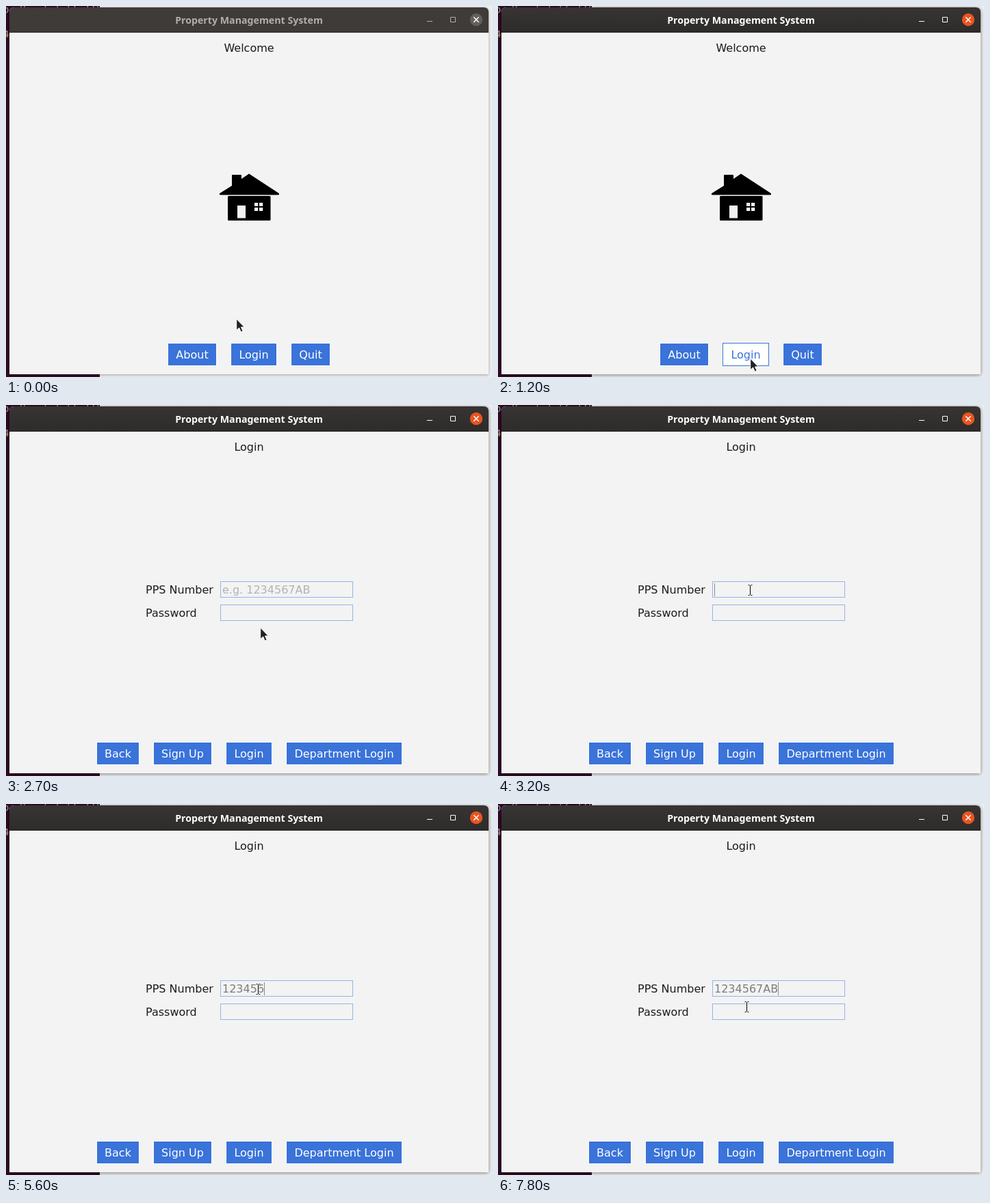
An HTML page for the animation above (8 s loop, 710 by 543 pixels).

```html
<!DOCTYPE html>
<html lang="en">
<head>
<meta charset="utf-8">
<title>Property Management System</title>
<style>
  html, body { margin: 0; width: 100%; height: 100%; overflow: hidden; background: #f1f0f0; }
  svg { position: absolute; left: 0; top: 0; display: block; }
  text { font: 16px "DejaVu Sans", sans-serif; fill: #1c1c1c; white-space: pre; }
  .title { font: bold 14.2px "Noto Sans", "Open Sans", sans-serif; fill: #fff; }
  .mono { font: 14px "DejaVu Sans Mono", monospace; }
  .mid { text-anchor: middle; }
  .btn rect { fill: #3a73d9; stroke: #fff; }
  .btn text { fill: #fff; }
  .btn.hover rect { fill: #fff; stroke: #3a73d9; }
  .btn.hover text { fill: #3a73d9; }
  .field { fill: #f3f3f3; stroke: #94b5e5; }
  .blurred .title { fill: #b3aea7; }
  .blurred .bar { fill: #3e3b39; }
  .blurred .ctl { stroke: #b3aea7; }
  .blurred .close { fill: #62605e; }
  .bar { fill: url(#bar); }
  .ctl { fill: none; stroke: #fff; }
  .close { fill: #e95420; }
  .frame { fill: #f3f3f3; filter: drop-shadow(0 1px 3px rgba(0, 0, 0, .5)); }
  .blurred .frame { filter: drop-shadow(0 1px 2px rgba(0, 0, 0, .36)); }
</style>
</head>
<body>
<svg width="710" height="543" viewBox="0 0 710 543">
  <defs>
    <linearGradient id="bar" x1="0" y1="0" x2="0" y2="1">
      <stop offset="0" stop-color="#373433"/>
      <stop offset="1" stop-color="#2e2b2b"/>
    </linearGradient>
  </defs>

  <rect width="710" height="543" fill="#f1f0f0"/>
  <rect width="137" height="543" fill="#300a24"/>
  <text class="mono" x="-4" y="10" style="fill:#9aa0ad">o</text>
  <text class="mono" x="-4" y="46" style="fill:#b59c83">4</text>
  <text class="mono" x="20" y="5" style="fill:#a89ba8">p   l 1 l1 551</text>

  <g id="win">
    <path class="frame" d="M5 539V9q0-7 7-7H698q7 0 7 7V539z"/>
    <path class="bar" d="M5 39V9q0-7 7-7H698q7 0 7 7V39z"/>
    <path d="M5 38.5H705" stroke="#242221"/>
    <text class="title mid" x="355" y="26">Property Management System</text>
    <path class="ctl" d="M615 22.5H623M649.5 16.5H656.5V23.5H649.5z"/>
    <circle class="close" cx="687" cy="20" r="9.2"/>
    <path d="M683.3 16.3l7.4 7.4m0-7.4l-7.4 7.4" stroke="#fff" stroke-width="1.5"/>
  </g>

  <g id="home">
    <text class="mid" x="355" y="67">Welcome</text>
    <path d="M330 263V248q0-1 1-1H343q1 0 1 1V253L355 245.5 398.5 274q1.5 2.5-1 2.5H313.5q-3 0-1-2.5z"/>
    <rect x="324" y="278" width="62.5" height="36" rx="1.5"/>
    <path d="M338 292h12v18.5h-12zM363 288h5.2v5h-5.2zM370 288h5.2v5h-5.2zM363 295h5.2v5h-5.2zM370 295h5.2v5h-5.2z" fill="#f3f3f3"/>
  </g>

  <g id="login">
    <text class="mid" x="355" y="67">Login</text>
    <text x="204" y="276">PPS Number</text>
    <text x="204" y="310">Password</text>
    <rect class="field" x="313.5" y="258.5" width="193" height="23"/>
    <rect class="field" x="313.5" y="292.5" width="193" height="23"/>
    <text id="entry" x="316" y="276"></text>
    <rect id="caret" y="261" width="1" height="19" fill="#8a8a8a"/>
  </g>

  <path id="arrow" d="M.7 1V17.6L4.6 14 7.2 20 10.1 18.8 7.5 13H12.3z" fill="#222" stroke="#fff" stroke-linejoin="round"/>
  <g id="beam" fill="none">
    <path d="M-3-7.5H3M-3 7.5H3M0-7.5V7.5" stroke="#fff" stroke-width="3"/>
    <path d="M-3-7.5H-.8M.8-7.5H3M-3 7.5H-.8M.8 7.5H3M0-7V7" stroke="#111" stroke-width="1.2"/>
  </g>
</svg>
<script>
const LOOP = 8000;
const $ = id => document.getElementById(id);

function el(parent, tag, attrs, text = '') {
  const node = document.createElementNS('http://www.w3.org/2000/svg', tag);
  for (const key in attrs) node.setAttribute(key, attrs[key]);
  node.textContent = text;
  return parent.appendChild(node);
}

function button(page, label, left, right) {
  const g = el($(page), 'g', { class: 'btn' });
  el(g, 'rect', { x: left - 0.5, y: 493.5, width: right - left + 1, height: 33 });
  el(g, 'text', { class: 'mid', x: (left + right) / 2, y: 516 }, label);
  return g;
}

button('home', 'About', 237, 307);
const loginBtn = button('home', 'Login', 329, 395);
button('home', 'Quit', 417, 473);
button('login', 'Back', 133, 194);
button('login', 'Sign Up', 216, 300);
button('login', 'Login', 322, 388);
button('login', 'Department Login', 410, 578);

// [start ms, shape, x, y]
const pointer = [
  [0, 'arrow', 336, 457], [100, 'arrow', 344, 471], [200, 'arrow', 360, 498],
  [300, 'arrow', 366, 511], [500, 'arrow', 368, 515],
  [2400, 'arrow', 368, 480], [2500, 'arrow', 368, 398],
  [2700, 'arrow', 371, 325], [2800, 'beam', 370.5, 262.5], [2900, 'beam', 368.5, 271],
  [7400, 'beam', 368.5, 274], [7500, 'beam', 367.5, 281], [7600, 'beam', 365.5, 289],
  [7700, 'beam', 364.5, 294], [7800, 'beam', 363.5, 297]
];

// [start ms, characters typed, caret shown]
const typing = [
  [3200, 0, 1], [4000, 2, 1], [4300, 3, 1], [4600, 4, 1], [5000, 5, 1],
  [5500, 5, 0], [5600, 6, 1], [6100, 7, 1], [6500, 7, 0], [6900, 9, 1],
  [7400, 9, 0], [7700, 9, 1]
];

const CODE = '1234567AB';
const at = (steps, t) => steps.findLast(step => step[0] <= t);
const show = (id, on) => $(id).setAttribute('visibility', on ? 'visible' : 'hidden');

// DejaVu Sans advances at 16px
const caretX = n => 316 + Math.floor(n * 10.18 + Math.max(0, n - 7) * 0.78);

function draw(t) {
  $('win').classList.toggle('blurred', t < 1200);
  loginBtn.classList.toggle('hover', t >= 200);
  $('home').style.display = t < 1800 ? '' : 'none';
  $('login').style.display = t < 1800 ? 'none' : '';

  const step = at(typing, t);
  const [, count, caretOn] = step || [0, 0, 0];
  $('entry').textContent = step ? CODE.slice(0, count) : 'e.g. ' + CODE;
  $('entry').style.fill = step ? '#7d7d7d' : '#b3b3b3';
  $('caret').setAttribute('x', caretX(count));
  show('caret', caretOn);

  const [, shape, x, y] = at(pointer, t);
  show('arrow', shape === 'arrow');
  show('beam', shape === 'beam');
  $(shape).setAttribute('transform', `translate(${x} ${y})`);
}

const start = performance.now();
function tick() {
  draw((performance.now() - start) % LOOP);
  requestAnimationFrame(tick);
}
tick();
</script>
</body>
</html>
```
